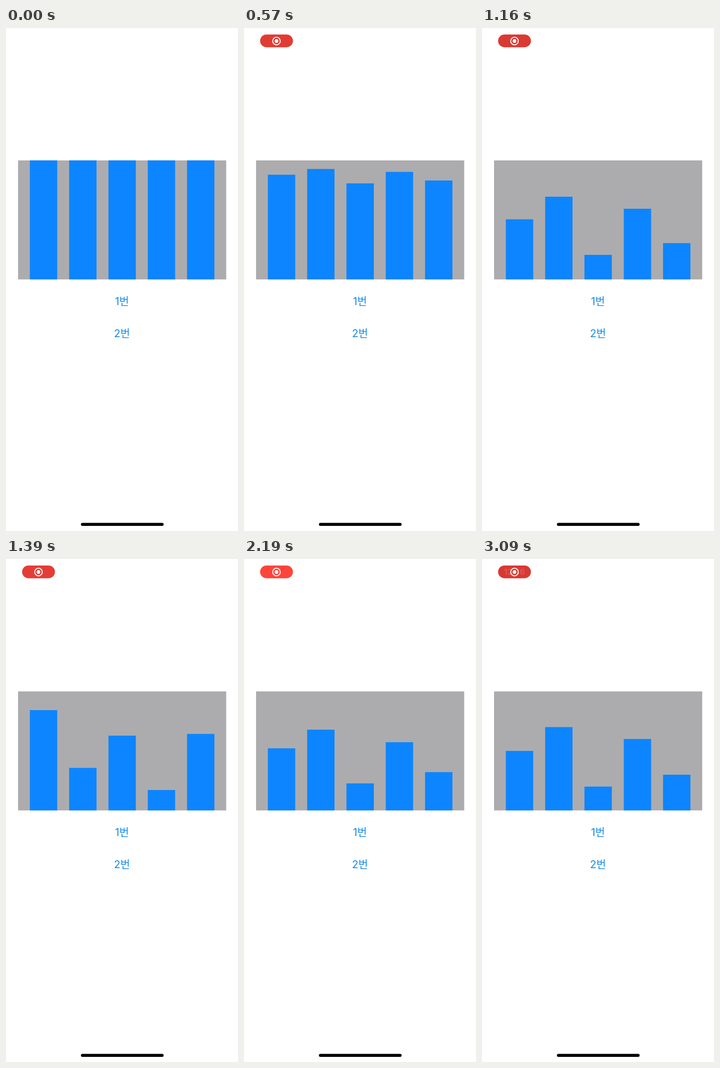
These frames come from a looping animation (500 px wide and 1082 px high, 3190 ms). An HTML page with a canvas:

```html
<!DOCTYPE html>
<html lang="ko">
<head>
<meta charset="utf-8">
<title>Bar chart</title>
<style>
  html, body { margin: 0; width: 100%; height: 100%; overflow: hidden; background: #fff; }
  canvas { display: block; width: 500px; height: 1082px; }
</style>
</head>
<body>
<canvas id="stage" width="500" height="1082"></canvas>
<script>
const ctx = document.getElementById('stage').getContext('2d');
const LOOP = 3190;
const FONT = 'Inter, "Noto Sans CJK KR", "Noto Sans CJK", sans-serif';

// The picture is refreshed about ten times a second, at these times.
const STEPS = [0, 100, 200, 290, 380, 470, 570, 700, 790, 890, 980, 1070, 1160,
  1290, 1390, 1490, 1580, 1680, 1770, 1870, 1970, 2090, 2190, 2290, 2390, 2490,
  2590, 2690, 2790, 2890, 2990, 3090];

const FULL = [1, 1, 1, 1, 1];
const FIRST = [0.5, 0.7, 0.2, 0.6, 0.3];
const SECOND = [0.9, 0.3, 0.7, 0.1, 0.7];
const MOVES = [
  { start: 451, length: 350, to: FIRST },
  { start: 1132, length: 350, to: SECOND },
  { start: 1911.5, length: 333, to: FIRST }
];

const CHART = { x: 26, y: 284.8, w: 448.6, h: 256 };
const BAR = { x: 51.4, pitch: 84.7, w: 59 };

const mix = (a, b, p) => a + (b - a) * p;

// cubic-bezier(0.42, 0, 0.58, 1)
function easeInOut(x) {
  if (x <= 0) return 0;
  if (x >= 1) return 1;
  let lo = 0, hi = 1;
  for (let i = 0; i < 24; i++) {
    const u = (lo + hi) / 2, v = 1 - u;
    if (1.26 * u * v * v + 1.74 * u * u * v + u * u * u < x) lo = u;
    else hi = u;
  }
  return lo * lo * (3 - 2 * lo);
}

function levelsAt(t) {
  return MOVES.reduce((levels, move) => {
    const p = easeInOut((t - move.start) / move.length);
    return levels.map((v, i) => mix(v, move.to[i], p));
  }, FULL);
}

function rect(x, y, w, h, color) {
  ctx.fillStyle = color;
  ctx.fillRect(x, y, w, h);
}

function pill(x, y, w, h, color) {
  ctx.fillStyle = color;
  ctx.beginPath();
  ctx.roundRect(x, y, w, h, h / 2);
  ctx.fill();
}

function disc(x, y, r, color) {
  ctx.fillStyle = color;
  ctx.beginPath();
  ctx.arc(x, y, r, 0, Math.PI * 2);
  ctx.fill();
}

function label(text, x, y, font, color) {
  ctx.font = font + ' ' + FONT;
  ctx.fillStyle = color;
  ctx.fillText(text, x, y);
}

function drawChart(t) {
  rect(CHART.x, CHART.y, CHART.w, CHART.h, '#acacae');
  levelsAt(t).forEach((level, i) => {
    const h = level * CHART.h;
    rect(BAR.x + i * BAR.pitch, CHART.y + CHART.h - h, BAR.w, h, '#0d85ff');
  });
}

function drawRecorder(t) {
  const glow = 0.5 + 0.5 * Math.cos((t - 2080) / 2260 * Math.PI * 2);
  const red = `rgb(${mix(215, 255, glow)}, ${mix(57, 69, glow)}, ${mix(50, 59, glow)})`;
  pill(34.7, 13.9, 70.8, 27.5, red);
  // The clock starts to fade in behind the icon.
  if (t >= 3090) {
    label('12:36', 70, 34.3, '600 17px', 'rgba(255, 255, 255, 0.17)');
    disc(70, 28, 10, red);
  }
  disc(70, 28, 9.2, '#fff');
  disc(70, 28, 7.2, red);
  disc(70, 28, 3.9, '#fff');
}

function draw(t) {
  rect(0, 0, 500, 1082, '#fff');
  ctx.textAlign = 'center';
  drawChart(t);
  label('1번', 250, 596, '22.5px', '#148ae8');
  label('2번', 250, 665, '22.5px', '#148ae8');
  pill(161.5, 1064.6, 178.2, 6.4, '#000');
  if (t >= 100) drawRecorder(t);
}

const begin = performance.now();
function tick() {
  const t = (performance.now() - begin) % LOOP;
  draw(STEPS.findLast(step => step <= t));
  requestAnimationFrame(tick);
}
tick();
</script>
</body>
</html>
```
